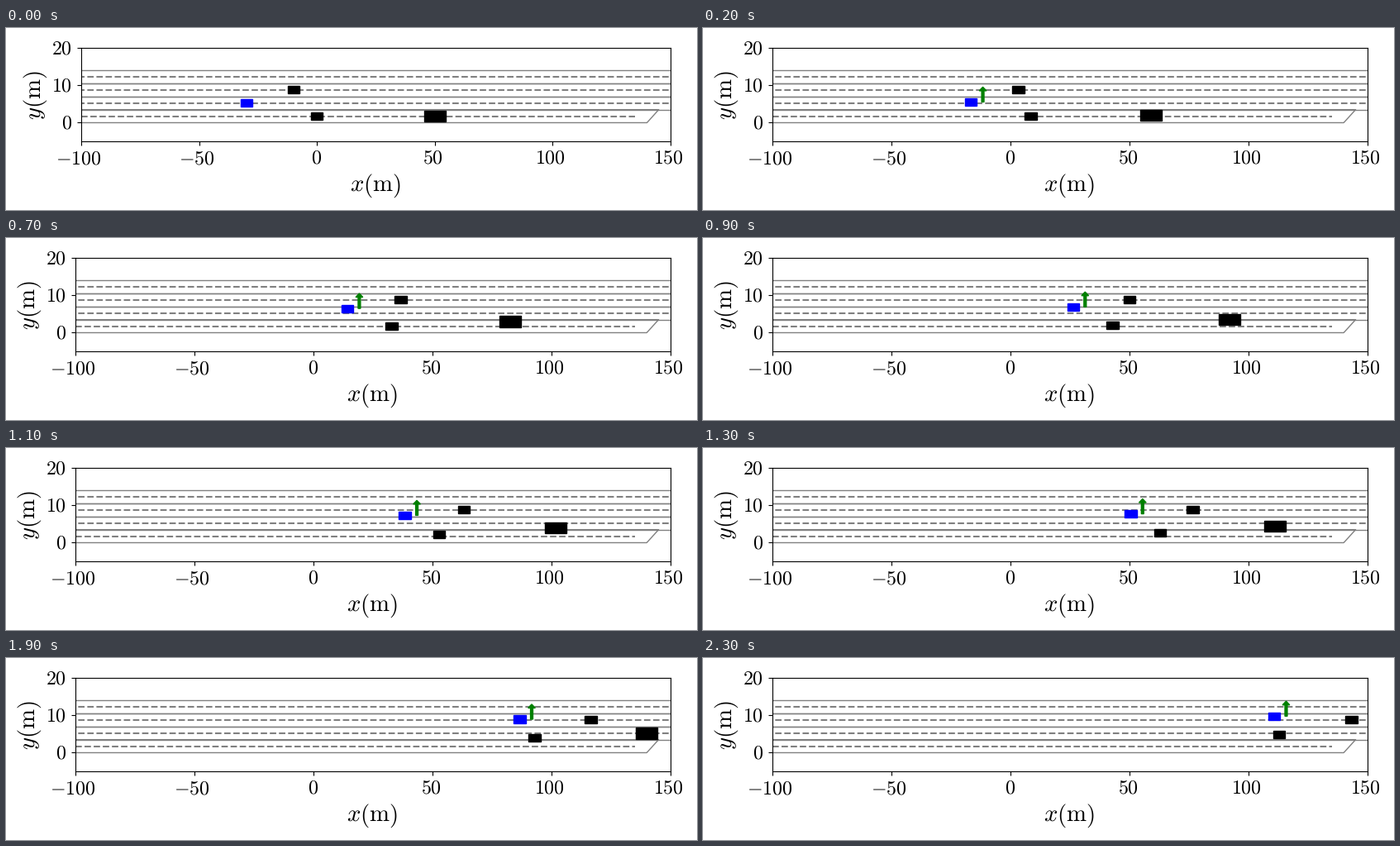
Write a matplotlib script that moves like this. It is 836x220 px and loops after 2400 ms.

```python
import numpy as np
import matplotlib.pyplot as plt
from matplotlib.animation import FuncAnimation
from matplotlib.patches import FancyArrow, Rectangle

plt.rcParams["mathtext.fontset"] = "cm"
plt.rcParams["text.hinting"] = "none"

W, H, DPI = 836, 220, 100
FRAMES, INTERVAL = 24, 100
RIGHT, TOP, BOTTOM = 804, 24, 137.1
LANE = 3.5
MERGE = 21  # frames a lane change takes
TICK_SIZE, LABEL_SIZE = 17.28, 20.74

fig = plt.figure(figsize=(W / DPI, H / DPI), dpi=DPI)
ax = fig.add_axes([0.1, 0.38, 0.86, 0.51])
ax.set(xlim=(-100, 150), ylim=(-5, 20),
       xticks=range(-100, 151, 50), yticks=(0, 10, 20))
ax.tick_params(labelbottom=False, labelleft=False)


def place_axes(left):
    ax.set_position([left / W, 1 - BOTTOM / H,
                     (RIGHT - left) / W, (BOTTOM - TOP) / H])


def note(text, xy, coords, offset, size, **kw):
    ax.annotate(text, xy, xycoords=coords, xytext=offset,
                textcoords="offset pixels", fontsize=size,
                va="baseline", **kw)


def center(i):
    return (i + 0.5) * LANE


# Tick labels and axis titles, anchored to the axes in pixels
for v in range(-100, 151, 50):
    shift = -0.9 * len(str(v))
    drop = -28 if v < 0 else -27
    note(f"${v}$", (v, 0), ("data", "axes fraction"), (shift, drop),
         TICK_SIZE, ha="center")
for v in (0, 10, 20):
    note(f"${v}$", (0, v), ("axes fraction", "data"), (-10.7, -8),
         TICK_SIZE, ha="right")
note(r"$x\mathrm{(m)}$", (0.5, 0), "axes fraction", (-1, -60.4),
     LABEL_SIZE, ha="center")
note(r"$y\mathrm{(m)}$", (0, 0.5), "axes fraction", (-48.6, -1),
     LABEL_SIZE, ha="center", rotation=90, rotation_mode="anchor")

# Road: three through lanes and the merging ramp
for i in range(1, 4):
    for edge in (i, i + 1):
        ax.plot([-200, 200], [edge * LANE] * 2, color="gray", lw=1)
    ax.plot([-200, 200], [center(i)] * 2, "--", color="gray", lw=1.5)
ax.plot([-100, 135], [center(0)] * 2, "--", color="gray", lw=1.5)
ax.plot([-100, 140, 145, -100], [0, 0, LANE, LANE], color="gray", lw=1)


def cruise(k, start, speed, gain=0):
    """Steady speed after an early change that gains some distance."""
    return start + speed * k + gain * (1 - np.exp(-k / 2))


def change_lane(k, begin):
    """Smooth move from the ramp into the first lane."""
    t = np.clip((k - begin) / MERGE, 0, 1)
    return center(0) + LANE * t * t * (3 - 2 * t)


def vehicle(w=5, h=2, color="black"):
    return ax.add_patch(Rectangle((0, 0), w, h, color=color, zorder=3))


def move(box, x, y):
    box.set_xy((x - box.get_width() / 2, y - box.get_height() / 2))


ego = vehicle(color="blue")
passer = vehicle()
merger = vehicle()
truck = vehicle(9, 3)
arrow = ax.add_patch(FancyArrow(0, 0, 0, 3, width=1, head_width=3,
                                head_length=1, color="green", zorder=3))


def update(k):
    place_axes(84 if k else 91)
    x, y = cruise(k, -30, 6.03, 2.1), cruise(k, center(1), 0.205, -0.2)
    move(ego, x, y)
    move(passer, cruise(k, -10, 6.66), center(2))
    move(merger, cruise(k, 0, 5.01, -2.3), change_lane(k, 6.5))
    move(truck, cruise(k, 50, 4.77, -0.8), change_lane(k, -1.5))
    arrow.set_data(x=x + 5, y=y)
    arrow.set_visible(k > 0)
    return []


anim = FuncAnimation(fig, update, frames=FRAMES, interval=INTERVAL,
                     init_func=lambda: [], repeat=True, repeat_delay=0)
plt.show()
```
